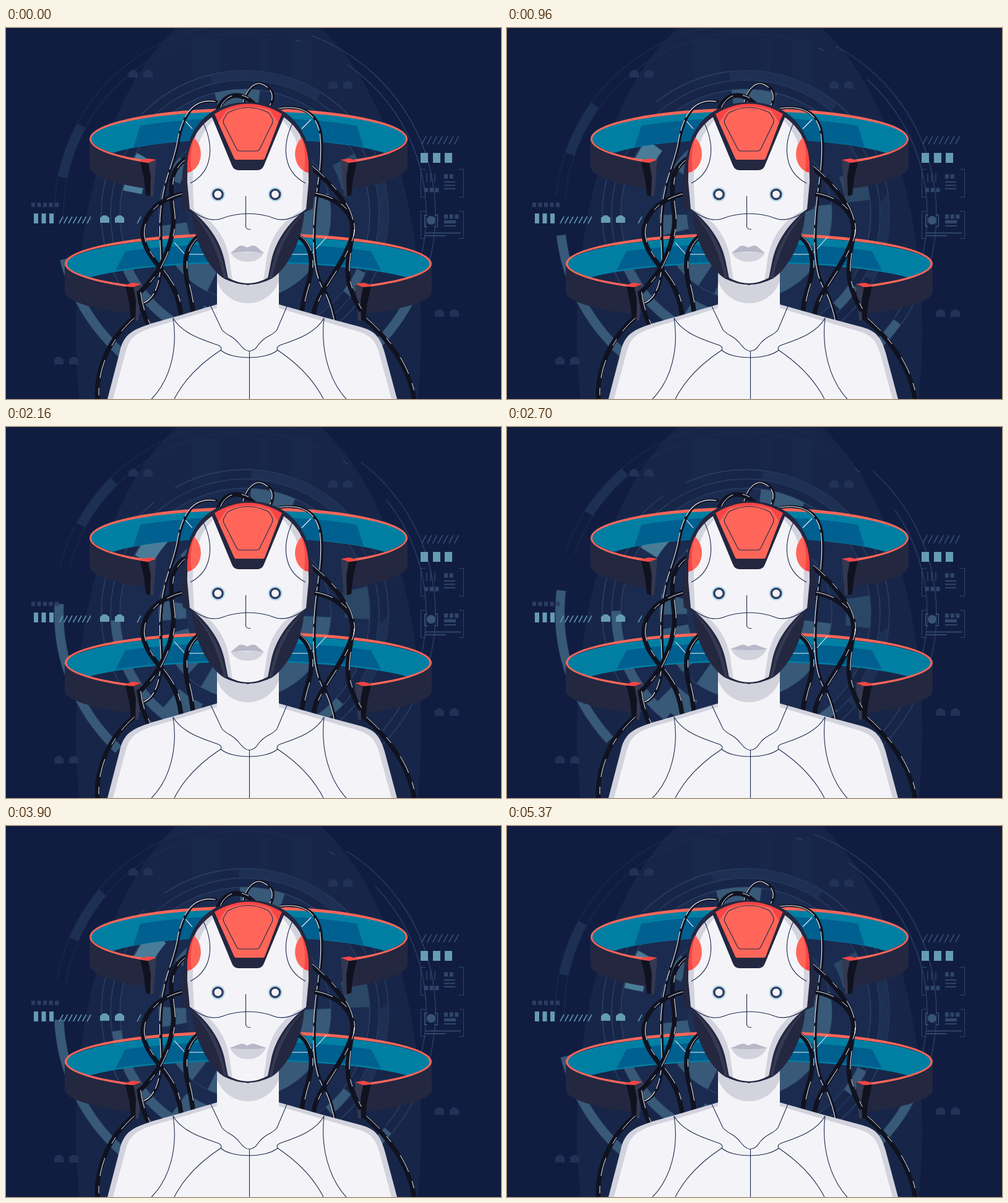
An HTML page without scripts for the animation above (5400 ms loop, 800x600 px).

```html
<!DOCTYPE html>
<html lang="en">
<head>
<meta charset="utf-8">
<title>Android</title>
<style>
html, body { margin: 0; width: 100%; height: 100%; overflow: hidden; background: #101d41; }
svg { display: block; width: 800px; height: 600px; }
.dial { fill: none; animation: sway 2.7s linear infinite alternate; }
@keyframes sway { to { transform: rotate(21deg); } }
.lips, .smile { animation: lips 5.4s step-end infinite; }
.smile { animation-name: smile; }
@keyframes lips { 0% { opacity: 1; } 50% { opacity: 0; } }
@keyframes smile { 0% { opacity: 0; } 50% { opacity: 1; } }
.dim { stroke: #1d3053; }
.mid { stroke: #2b4766; }
.lit { stroke: #385978; }
.hot { stroke: #4b7c97; }
.hair { stroke: #354b70; }
.faint { stroke: #1c2c50; }
.cable { fill: none; stroke: #10121f; stroke-linecap: round; }
.glint { fill: none; stroke: #f4f4f8; stroke-width: 1.1; stroke-dasharray: 60 5 18 5; }
.sparse { stroke-width: 1; stroke-dasharray: 30 16 12 26; }
.wire { stroke-dasharray: none; }
.seam { fill: none; stroke: #1d2b50; stroke-width: 1.1; }
.ink { fill: #242740; }
.shade { fill: #d3d3de; }
.skin { fill: #f4f4f8; }
.coral { fill: #ff6659; }
.red { fill: #f94545; }
</style>
</head>
<body>
<svg viewBox="0 0 800 600">
<defs>
  <path id="house" d="M0 12V4L5 0H10L15 4V12z"/>
  <path id="slash" d="M0 11L6 0"/>
  <g id="slashes">
    <use href="#slash"/><use href="#slash" x="7.5"/><use href="#slash" x="15"/><use href="#slash" x="22.5"/>
    <use href="#slash" x="30"/><use href="#slash" x="37.5"/><use href="#slash" x="45"/>
  </g>
  <g id="houses"><use href="#house"/><use href="#house" x="24"/></g>
  <g id="cap">
    <path fill="#343850" d="M229 218L243 213 238 272H232z"/>
    <path fill="#10121f" d="M217 217L230 218 234 240 233 272 226 270 223 243z"/>
    <path class="red" d="M215 215L229 211 243 213 230 218z"/>
  </g>
  <g id="thin">
    <path d="M340 119C304 113 287 140 279 180C273 220 257 240 252 290C246 340 256 370 249 405C244 430 234 442 220 446"/>
    <path d="M443 130C482 124 504 140 509 172C514 215 504 250 500 300C496 350 498 400 516 425Q527 447 533 478"/>
    <path d="M384 122C390 96 406 85 418 92C433 100 435 112 427 127"/>
  </g>
  <g id="thick">
    <path d="M343 132C352 108 376 100 400 122"/>
    <path d="M297 208C264 225 264 252 270 298C274 330 262 362 246 392Q232 412 218 426"/>
    <path d="M286 268C242 278 220 305 221 335C224 365 250 385 266 412Q279 434 283 464"/>
    <path d="M310 338C286 358 288 385 293 412Q299 434 302 458"/>
    <path d="M215 428Q219 460 232 482"/>
    <path d="M205 470C170 500 143 550 148 604"/>
    <path d="M490 222C530 256 562 292 560 330C557 358 548 385 555 415Q562 438 572 455"/>
    <path d="M497 268C542 276 566 305 560 335C550 370 530 395 512 425Q499 445 497 464"/>
    <path d="M473 337C497 354 496 385 489 412Q481 436 478 458"/>
    <path d="M580 470C620 505 653 550 660 604"/>
  </g>
  <g id="side">
    <path class="ink" d="M392 120C344 120 314 142 298 178L290 208Q280 250 286 292L300 298C303 342 326 388 352 405L392 416z"/>
    <path class="shade" d="M392 126C350 127 322 147 307 172Q292 204 293 250L297 293C313 305 343 332 353 375L359 405Q376 413 392 413z"/>
    <path class="skin" d="M392 126C354 128 331 146 315 178Q300 214 302 256L304 295C328 306 352 330 360 368L366 408Q380 413 392 413z"/>
    <path fill="#353a52" d="M300 299C319 314 342 342 350 378L357 404 352 405C345 370 330 330 300 299z"/>
    <path class="coral" d="M304 177Q315 188 315 205Q313 229 293 234Q292 200 304 177z"/>
    <path class="red" d="M304 177Q296 204 300 232L293 234Q292 200 304 177z"/>
    <path class="seam" d="M319 154C336 190 335 232 298 251"/>
  </g>
  <g id="eye">
    <circle r="11.5" fill="#b9d9e8"/><circle r="9.3" fill="#2c3d62"/><circle r="6" fill="#f6f2f5"/>
  </g>
</defs>

<rect width="800" height="600" fill="#101d41"/>
<ellipse cx="392" cy="490" rx="279" ry="539" fill="#172648"/>
<path fill="#1b2a4d" opacity=".5" d="M300 18h45v75h-45zM411 18h14v70h-14zM462 18h32v75h-32z"/>

<!-- swaying dial; angles run clockwise from the right -->
<g transform="translate(386 301)">
  <g class="dial">
    <circle r="202" fill="#1a2b4f"/>
    <circle r="95" fill="#1d3053"/>
    <g class="faint">
      <circle r="308" pathLength="360" stroke-dasharray="92 360" transform="rotate(178)"/>
      <circle r="293" pathLength="360" stroke-dasharray="100 360" transform="rotate(178)"/>
    </g>
    <g class="hair">
      <circle r="308" pathLength="360" stroke-dasharray="97 360" transform="rotate(-69.3)"/>
      <circle r="293" pathLength="360" stroke-dasharray="2 16.4 83 360" transform="rotate(-74)"/>
      <circle r="232" pathLength="360" stroke-dasharray="347 10 3 0" transform="rotate(227)"/>
      <circle r="217"/><circle r="202"/><circle r="139"/>
    </g>
    <g stroke-width="15">
      <circle class="dim" r="300.5" pathLength="360" stroke-dasharray="17 360" transform="rotate(191.4)"/>
      <circle class="lit" r="300.5" pathLength="360" stroke-dasharray="42 46 50 360" transform="rotate(28)"/>
      <circle class="dim" r="224.5" pathLength="360" stroke-dasharray="46 44 34 360" transform="rotate(256)"/>
      <circle class="lit" r="209.5" pathLength="360" stroke-dasharray="12 68 54 360" transform="rotate(26)"/>
    </g>
    <g stroke-width="40">
      <circle class="lit" r="182" pathLength="360" stroke-dasharray="21 360" transform="rotate(256)"/>
      <circle class="mid" r="182" pathLength="360" stroke-dasharray="15 360" transform="rotate(331)"/>
      <circle class="lit" r="182" pathLength="360" stroke-dasharray="16 360" transform="rotate(98)"/>
    </g>
    <circle class="hot" r="185" stroke-width="31" pathLength="360" stroke-dasharray="18.6 360" transform="rotate(191)"/>
    <circle class="lit" r="117" stroke-width="44" pathLength="360" stroke-dasharray="118 12 32 10 14 360" transform="rotate(-14)"/>
    <circle class="lit" r="128" stroke-width="24" pathLength="360" stroke-dasharray="16 360" transform="rotate(205)"/>
  </g>
</g>

<!-- readouts -->
<g fill="#213256">
  <use href="#houses" x="198" y="68"/><use href="#houses" x="521" y="86"/>
  <use href="#houses" x="693" y="455"/><use href="#houses" x="78" y="532"/>
</g>
<g fill="#669cb3">
  <use href="#houses" x="152" y="303"/>
  <path d="M45 300h7v16h-7zM57.500 300h7v16h-7zM70 300h7v16h-7zM670 202h12v16h-12zM690 202h12v16h-12zM709 202h12v16h-12z"/>
</g>
<g stroke="#5d94ad" stroke-width="1.6">
  <use href="#slashes" x="86" y="305"/><use href="#slash" x="212" y="305"/><use href="#slash" x="220" y="305"/>
</g>
<g stroke="#3b5778" stroke-width="1.2"><use href="#slashes" transform="translate(672 175) scale(1.17 1.2)"/></g>
<path stroke="#2b3d61" stroke-width="7" stroke-dasharray="6 3.500" d="M41 286H85"/>
<g fill="none" stroke="#2f4668">
  <path d="M678 228.500H670.500V273.500H678M732 228.500H739.500V273.500H732M678 296.500H670.500V340.500H678M732 296.500H739.500V340.500H732"/>
  <path stroke="#456485" d="M681 302.500H676.500V321.500H681M693 302.500H697.500V321.500H693"/>
  <path stroke-width="1.5" d="M680 235v14M686.500 235v14M693 235v14"/>
  <path stroke-width="7" stroke-dasharray="6 2.700" d="M676 262h24M708 240h15M708 305h26"/>
  <path stroke-width="2" d="M708 249h18M708 254.500h18M708 260h18M708 320h19M677 331.500h58M677 336h34"/>
  <path stroke-width="5" d="M708 313.500h19"/>
</g>
<circle cx="687" cy="311" r="7" fill="#385474"/>

<!-- upper halo -->
<path fill="#007fa3" d="M136 178A256 47 0 0 1 648 178Q646 191 612 202A256 47 0 0 0 172 202Q138 191 136 178z"/>
<path fill="#006090" d="M217 158A256 47 0 0 1 567 158L578 193A256 47 0 0 0 206 193z"/>
<g class="ink">
  <path d="M135 178A257 47 0 0 0 228 214V260A257 47 0 0 1 135 223z"/>
  <path d="M649 178A257 47 0 0 1 556 214V260A257 47 0 0 0 649 223z"/>
</g>
<path class="coral" d="M228 218A257 50 0 1 1 556 218V214A254 45 0 1 0 228 214z"/>
<use href="#cap"/>
<use href="#cap" transform="translate(784) scale(-1 1)"/>

<!-- lower halo -->
<path fill="#007fa3" d="M96 381A296 47 0 0 1 687 381Q684 393 650 404A296 47 0 0 0 133 404Q99 393 96 381z"/>
<path fill="#006090" d="M193 361A296 47 0 0 1 590 361L606 392A296 47 0 0 0 177 392z"/>
<g class="ink">
  <path d="M95 381A296.500 47 0 0 0 205 417V463A296.500 47 0 0 1 95 428z"/>
  <path d="M688 381A296.500 47 0 0 1 578 417V463A296.500 47 0 0 0 688 428z"/>
</g>
<path class="coral" d="M205 420A296.500 50 0 1 1 578 420V416A293 45 0 1 0 205 416z"/>
<use href="#cap" x="-24" y="201"/>
<use href="#cap" transform="translate(807 201) scale(-1 1)"/>
<path class="glint wire" d="M287 147L301 163M493 148L478 163M272 347L289 366H345M518 338L493 366H440"/>

<use href="#thin" class="cable" stroke-width="4.500"/>
<use href="#thin" class="glint" x="-1.500"/>
<use href="#thick" class="cable" stroke-width="7.500"/>
<use href="#thick" class="glint sparse" x="2.500" y="-1"/>

<!-- body -->
<path class="shade" d="M341 447L270 468C208 485 192 490 184 523L164 600H632L612 525C604 497 594 490 575 484L515 468 441 447z"/>
<path class="skin" d="M341 380V453L276 473C222 488 202 492 194 522L173 600H623L603 526C596 502 586 495 560 488L505 472 441 453V380z"/>
<path class="shade" d="M341 385V410C360 457 422 457 441 410V385z"/>
<g class="seam">
  <path d="M331 450L349 488C358 499 366 496 378 512Q386 522.500 393 522.500Q402 522.500 408 512C420 496 430 499 438 488L454 450M393.500 522V600"/>
  <path d="M270 469C285 495 320 505 343 513Q350 516 347 521C365 537 420 537 439 521Q436 516 443 513C465 505 500 495 514 469"/>
  <path d="M270 469C278 520 265 570 235 600M514 469C508 520 522 570 550 600M347 521Q295 555 272 600M439 521Q490 555 513 600"/>
</g>

<!-- head -->
<use href="#side"/>
<use href="#side" transform="translate(782) scale(-1 1)"/>
<path class="ink" d="M352 405Q391 425 430 405L425 403Q391 423 357 403z"/>
<path class="ink" d="M332 142L340 136H443L450 142 417 222Q414 230 406 230H376Q368 230 365 222z"/>
<path class="red" d="M337 139Q391 106 446 139L440 153 418 211Q417 213 414 213H372Q370 213 369 211L343 153z"/>
<path class="coral" d="M343 153L357 133Q391 121 427 133L440 153 418 211Q417 213 414 213H372Q370 213 369 211z"/>
<path class="seam" d="M352 155Q350 150 353 146L357 139Q359 136 363 135Q391 122 420 135Q424 136 426 139L430 146Q432 150 430 155L410 196Q408 199 405 199H378Q375 199 373 196z"/>
<path class="seam" d="M297 293C320 311 338 313 352 307C376 298 408 298 431 307C445 313 465 310 486 293M387.500 272V321Q387.500 326 395 325.500"/>
<use href="#eye" x="342.500" y="269"/>
<use href="#eye" x="435" y="269"/>
<g class="lips">
  <path class="shade" d="M363 363H417Q410 378 390 378Q371 378 363 363z"/>
  <path fill="#b9b8c8" d="M363 364L376 353Q381 350 390 355Q399 350 404 353L417 364Q390 360 363 364z"/>
</g>
<g class="smile">
  <path class="shade" d="M362 359H420Q411 377 390 377Q371 377 362 359z"/>
  <path fill="#b9b8c8" d="M361 359L377 353Q382 350 390 355Q399 350 404 353L421 359Q390 363 361 359z"/>
</g>
</svg>
</body>
</html>
```
